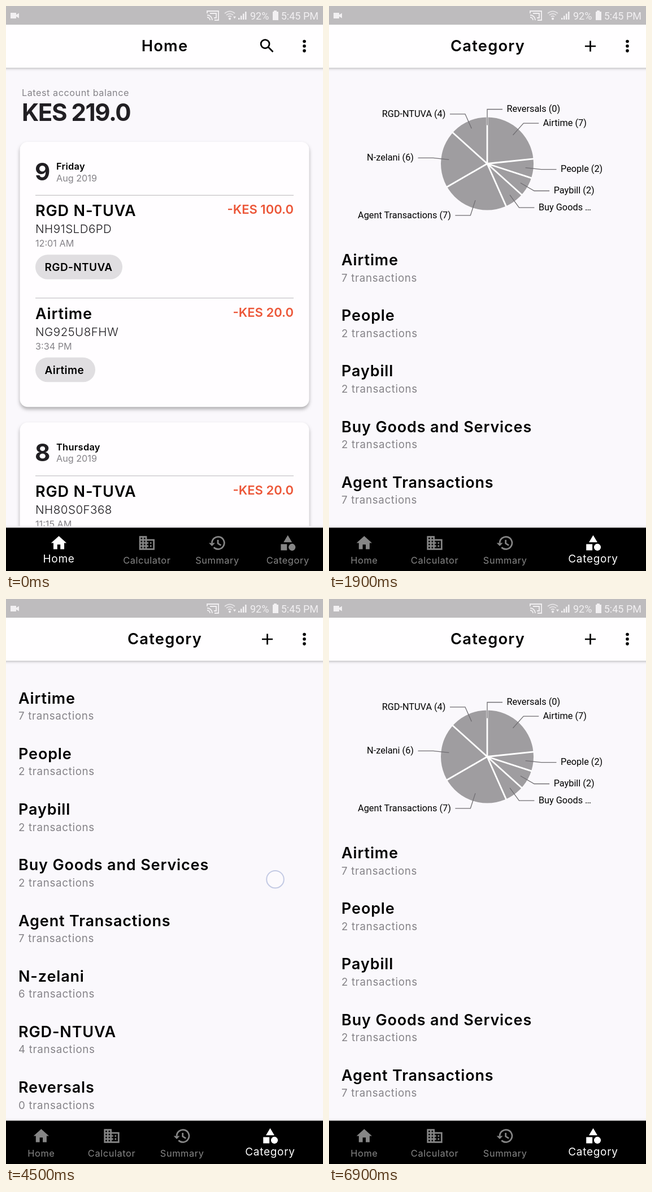
Write an HTML page that moves like this. It is 561x998 px and loops after 7.4 s.

```html
<!DOCTYPE html>
<html lang="en">
<head>
<meta charset="utf-8">
<title>Account balance app</title>
<style>
  html, body { margin: 0; width: 100%; height: 100%; overflow: hidden; background: #faf8fc; }
  svg { display: block; width: 100vw; height: 100vh; font-family: Inter, sans-serif; }
  .title { font-size: 27px; font-weight: 600; letter-spacing: .85px; }
  .head { font-size: 27.3px; font-weight: 600; letter-spacing: 1.2px; text-anchor: middle; }
  .big { font-size: 42px; font-weight: 700; letter-spacing: -1.4px; fill: #211f23; }
  .amount { font-size: 22px; font-weight: 600; fill: #ec5638; text-anchor: end; }
  .code { font-size: 20.5px; letter-spacing: .5px; font-weight: 300; fill: #1c1a1e; }
  .small { font-size: 16.2px; fill: #858388; }
  .spaced { letter-spacing: .55px; }
  .day { font-size: 16.4px; font-weight: 600; letter-spacing: .3px; }
  .chip { font-size: 19px; font-weight: 600; letter-spacing: .4px; }
  .sub { font-size: 18.7px; letter-spacing: .7px; fill: #858388; }
  .chart { font: 16.3px Roboto, sans-serif; }
  .status { font: 18px Roboto, sans-serif; fill: #f2f0f2; }
  .label { font-size: 19px; letter-spacing: .7px; text-anchor: middle; }
  .end { text-anchor: end; }
  .line { fill: none; stroke: currentColor; stroke-width: 2; }
  .card { fill: #fffdff; filter: drop-shadow(0 4px 3px rgba(0, 0, 0, .3)); }
  .bar { fill: #fffeff; filter: drop-shadow(0 2px 2px rgba(0, 0, 0, .22)); }
</style>
</head>
<body>
<svg id="stage" viewBox="0 0 561 998"></svg>
<script>
const LOOP = 7400, ICON_SCALE = 1.364, MAX_SCROLL = 279;
const PIE = { x: 280, y: 278.5, r: 82 };
const tabs = ['Home', 'Calculator', 'Summary', 'Category'];
const groups = [['Airtime', 7], ['People', 2], ['Paybill', 2], ['Buy Goods and Services', 2],
  ['Agent Transactions', 7], ['N-zelani', 6], ['RGD-NTUVA', 4], ['Reversals', 0]];

// Finger gestures; a drag with an anchor moves the list so that scroll = anchor - y
const gestures = [
  { at: 1300, ms: 100, from: [498, 951], to: [498, 951], lift: [1400, 1600], rest: 0, fill: .65 },
  { at: 3900, ms: 926, from: [450, 790], to: [487, 378], lift: [4900, 5200], rest: .1, fill: .35, anchor: 768.5 },
  { at: 6100, ms: 450, from: [503, 307], to: [466, 628], lift: [6600, 6900], rest: 0, fill: .35, anchor: 596.5 }
];

const clamp = (v, low, high) => Math.max(low, Math.min(high, v));
const mix = (a, b, k) => a + (b - a) * k;
const ramp = (t, from, to) => clamp((t - from) / (to - from), 0, 1);
const ease = (t, from, to) => {
  const k = ramp(t, from, to);
  return k * k * (3 - 2 * k);
};

// Squares of side 2 at every crossing of the given columns and rows
const squares = (xs, ys) => xs.flatMap(x => ys.map(y => `M${x} ${y}h2v2h-2z`)).join('');

// Icons on a 24 unit grid
const icons = {
  Home: '<path d="M10 20v-6h4v6h5v-8h3L12 3 2 12h3v8z"/>',
  Calculator: `<path fill-rule="evenodd" d="M2 3h10v4h10v14H2zM12 9h8v10h-8z
    ${squares([4, 8], [5, 9, 13, 17]) + squares([12, 16], [11, 15])}"/>`,
  Summary: `<path class="line" d="M5 12a8 8 0 1 1 2.35 5.65M12.75 8v4.6l4 2.4"/><path d="M1 12h8l-4 4z"/>`,
  Category: '<path d="M12 2l-5.5 9h11zM3 13.5h8v8H3z"/><circle cx="17.5" cy="17.5" r="4.5"/>',
  search: '<circle class="line" cx="9.5" cy="9.5" r="5.5"/><path class="line" d="M13.5 13.500l6.200 6.200"/>',
  add: '<path class="line" d="M5 12h14M12 5v14"/>'
};

const text = (cls, x, y, s) => `<text class="${cls}" x="${x}" y="${y}">${s}</text>`;
const icon = (name, x, y) =>
  `<g fill="currentColor" transform="translate(${x} ${y}) scale(${ICON_SCALE}) translate(-12 -12)">${icons[name]}</g>`;

function payment(y, [name, code, time, amount, tag, tagWidth]) {
  return `<path d="M52 ${y}H509" stroke="#c6c4c7" stroke-width="1.3"/>` +
    text('title', 52, y + 37, name) + text('amount', 509, y + 33, amount) +
    text('code', 52, y + 67, code) + text('small', 52, y + 91, time) +
    `<rect x="52" y="${y + 105}" width="${tagWidth}" height="43.5" rx="21.7" fill="#e0dee1"/>` +
    text('chip', 68.5, y + 134, tag);
}

function dayCard(y, number, day, payments) {
  const step = 181.5, top = 94.3;
  return `<rect class="card" x="24.5" y="${y}" width="512" height="${top + step * payments.length + 11}" rx="14"/>` +
    text('big', 51, y + 68, number) + text('day', 89, y + 49, day) + text('small', 89, y + 69.5, 'Aug 2019') +
    payments.map((p, i) => payment(y + top + step * i, p)).join('');
}

function homePage() {
  return text('small spaced', 28, 158.5, 'Latest account balance') + text('big', 28, 203, 'KES 219.0') +
    dayCard(240, 9, 'Friday', [
      ['RGD N-TUVA', 'NH91SLD6PD', '12:01 AM', '-KES 100.0', 'RGD-NTUVA', 154],
      ['Airtime', 'NG925U8FHW', '3:34 PM', '-KES 20.0', 'Airtime', 106]]) +
    dayCard(735.5, 8, 'Thursday', [
      ['RGD N-TUVA', 'NH80S0F368', '11:15 AM', '-KES 20.0', 'RGD-NTUVA', 154]]);
}

function pie() {
  const total = groups.reduce((sum, g) => sum + g[1], 0);
  const point = (angle, r) => [PIE.x + r * Math.sin(angle), PIE.y - r * Math.cos(angle)];
  let angle = 0, cuts = '', labels = '';
  for (const [name, count] of groups) {
    const sweep = count / total * 2 * Math.PI;
    const middle = (angle + sweep / 2) % (2 * Math.PI);
    const dir = middle < Math.PI ? 1 : -1;
    const [x, y] = point(middle, 68), [ex, ey] = point(middle, 96);
    const label = name.length > 20 ? name.slice(0, 9) + ' …' : `${name} (${count})`;
    cuts += `M${PIE.x} ${PIE.y}L${point(angle, PIE.r + 1)}`;
    labels += `<path d="M${x} ${y}L${ex} ${ey}h${27 * dir}" fill="none" stroke="#706e72" stroke-width="1.3"/>` +
      text(dir > 0 ? 'chart' : 'chart end', ex + 34.5 * dir, ey + 4.8, label);
    angle += sweep;
  }
  return `<circle cx="${PIE.x}" cy="${PIE.y}" r="${PIE.r}" fill="#9f9da0"/>
    <path d="${cuts}" stroke="#fff" stroke-width="2.8"/>` + labels;
}

function categoryPage() {
  return pie() + groups.map(([name, count], i) =>
    text('title', 22, 458 + 98.2 * i, name) + text('sub', 22, 486.5 + 98.2 * i, count + ' transactions')).join('');
}

function statusBar() {
  const bars = [0, 1, 2, 3].map(i => `M${411 + 4 * i} 24v${-3 - 3.7 * i}h2.500V24z`).join('');
  const waves = [3, 6, 9].map(w => `M${396 - w} ${22 - w}q${w} ${-w * .8} ${2 * w} 0`).join('');
  return `<rect width="561" height="33" fill="#bebcbe"/>
    <g fill="#f2f0f2">
      <path d="M8 12h10v3.5l5-3v9l-5-3V22H8zM472 10h2V8h5v2h3v15h-10z${bars}"/>
      <circle cx="396" cy="22.5" r="2"/>
      <path id="arrow" d="M402 18.5h5l-2.5 4z"/>
    </g>
    <g fill="none" stroke="#f2f0f2" stroke-width="1.8">
      <path d="M356 13V9h20v16h-7M356 16a9 9 0 0 1 9 9M356 20a5 5 0 0 1 5 5M361 13h11v8h-4"/>
      <path d="${waves}" opacity=".75"/>
    </g>` + text('status', 432, 23.5, '92%') + text('status end', 553, 23.5, '5:45 PM');
}

const get = id => document.getElementById(id);
const show = (id, on) => get(id).setAttribute('visibility', on ? 'visible' : 'hidden');
const set = (node, attrs) => {
  for (const name in attrs) node.setAttribute(name, attrs[name]);
};

get('stage').innerHTML = `<rect width="561" height="998" fill="#faf8fc"/>
  <g id="home">${homePage()}</g>
  <g id="category">${categoryPage()}</g>
  <ellipse id="glow" cx="384" rx="841"/>
  <rect class="bar" x="-9" y="33" width="579" height="76"/>
  <g id="homeBar">${text('head', 281, 80, 'Home') + icon('search', 462, 70.5)}</g>
  <g id="categoryBar">${text('head', 281, 80, 'Category') + icon('add', 462.5, 71)}</g>
  ${[-1, 0, 1].map(i => `<circle cx="528" cy="${70.8 + 8.3 * i}" r="2.8"/>`).join('')}
  ${statusBar()}
  <rect y="918.5" width="561" height="4" fill="#eeecef"/>
  <rect y="921.5" width="561" height="77"/>
  <circle id="ripple" cx="498.5" cy="960" fill="#fff"/>
  ${tabs.map(name => `<g class="tab">${icon(name, 0, 948.5)}<text class="label" fill="currentColor">${name}</text></g>`).join('')}
  <circle id="touch" r="15.3" fill="#fff" stroke="#c3cae4" stroke-width="2"/>`;

const tabNodes = [...document.querySelectorAll('.tab')];

// The selected tab is half as wide again as the others; k moves the selection from first to last
function drawTabs(k) {
  const unit = 561 / (tabs.length + .5);
  let left = 0;
  tabNodes.forEach((tab, i) => {
    const on = [1 - k, 0, 0, k][i];
    const width = unit * (1 + on / 2), grey = mix(134, 255, on);
    set(tab, { transform: `translate(${left + width / 2} 0)`, color: `rgb(${grey},${grey},${grey})` });
    set(tab.lastChild, { transform: `translate(0 ${985 - 2 * on}) scale(${mix(.86, 1, on)})` });
    left += width;
  });
}

function drawGesture(t) {
  const g = gestures.filter(g => t >= g.at).pop();
  show('touch', g);
  let scroll = 0;
  if (g) {
    const k = ease(t, g.at, g.at + g.ms);
    const [x, y] = g.from.map((v, i) => mix(v, g.to[i], k));
    set(get('touch'), {
      transform: `translate(${x} ${y})`,
      opacity: mix(1, g.rest, ramp(t, ...g.lift)),
      'fill-opacity': g.fill
    });
    if (g.anchor) scroll = clamp(g.anchor - y, 0, MAX_SCROLL);
  }
  set(get('category'), { transform: `translate(0 ${-scroll})` });
}

function draw(t) {
  const onCategory = t >= 1500;
  show('home', !onCategory);
  show('homeBar', !onCategory);
  show('category', onCategory);
  show('categoryBar', onCategory);
  show('arrow', t < 1500 || t >= 2800 && t < 4800 || t >= 6500);

  drawTabs(ease(t, 1400, 1700));
  drawGesture(t);

  const spread = ramp(t, 1400, 1800);
  set(get('ripple'), { r: 47 + 80 * spread, opacity: t < 1300 ? 0 : .065 * (1 - spread) });

  // Overscroll glow at the bottom of the list
  const pull = ease(t, 4500, 4800), fade = ease(t, 4900, 5200);
  const size = .6 * pull - .17 * fade;
  set(get('glow'), {
    cy: 921 + 728 * size,
    ry: 841 * size,
    opacity: t < 6100 ? .035 * pull - .023 * fade : 0
  });
}

const start = performance.now();
function tick() {
  const t = (performance.now() - start) % LOOP;
  draw(Math.floor(t / 100) * 100); // ten pictures a second
  requestAnimationFrame(tick);
}
tick();
</script>
</body>
</html>
```
